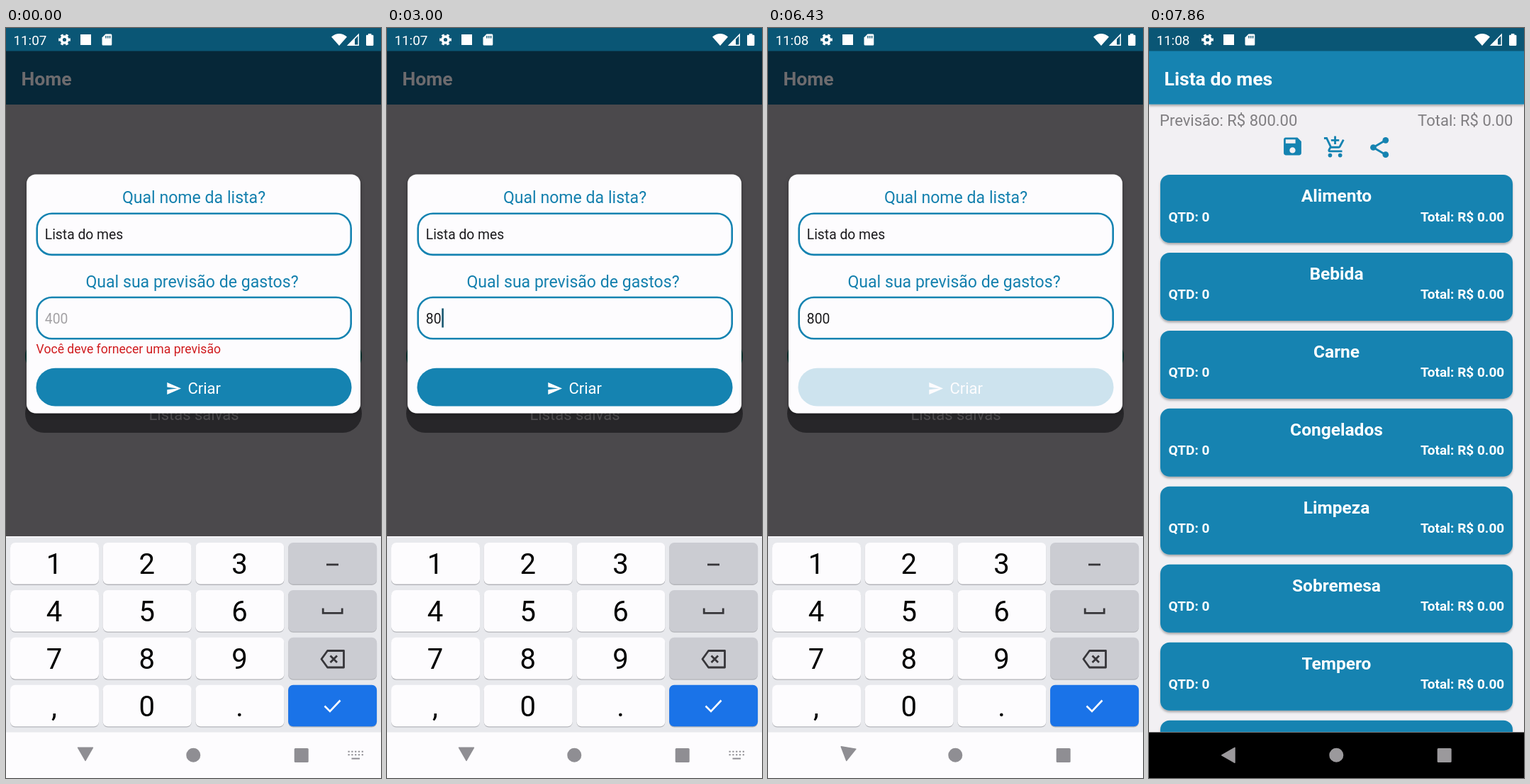
An HTML page that plays this animation: 529 by 1058 pixels, repeating every 8000 ms.

```html
<!DOCTYPE html>
<html lang="pt">
<head>
<meta charset="utf-8">
<title>Lista do mes</title>
<style>
  html, body { margin: 0; width: 100%; height: 100%; overflow: hidden; background: #f2f0f3; }
  svg { display: block; width: 100%; height: 100%; }
  text { font-family: Roboto, "Open Sans", sans-serif; white-space: pre; }
  .bold { font-weight: 700; }
  .mid { text-anchor: middle; }
  .end { text-anchor: end; }
</style>
</head>
<body>
<svg id="stage" viewBox="0 0 529 1058" xmlns="http://www.w3.org/2000/svg">
  <defs>
    <filter id="soft" x="-5%" y="-10%" width="110%" height="130%">
      <feDropShadow dx="0" dy="2.4" stdDeviation="1.8" flood-color="#000" flood-opacity=".3"/>
    </filter>
    <filter id="lift" x="-5%" y="-5%" width="110%" height="110%">
      <feDropShadow dx="0" dy="2" stdDeviation="3" flood-color="#000" flood-opacity=".3"/>
    </filter>
    <clipPath id="view"><rect id="viewBox" y="108" width="529" height="885"/></clipPath>
  </defs>

  <g id="home">
    <rect width="529" height="1058" fill="#4b494c"/>
    <rect y="32" width="529" height="76" fill="#062738"/>
    <text class="bold" x="21.5" y="81" font-size="26.6" fill="#6d6b6e">Home</text>
    <rect x="27" y="436" width="475" height="54" rx="27" fill="#06332f"/>
    <rect x="27" y="517" width="475" height="54" rx="27" fill="#272629"/>
    <text class="mid" x="265" y="553" font-size="22" fill="#504e51">Listas salvas</text>

    <rect x="29" y="206.5" width="471" height="337" rx="13" fill="#fdfcfe" filter="url(#lift)"/>
    <g class="mid" font-size="23.1" fill="#1480ae">
      <text x="265" y="247">Qual nome da lista?</text>
      <text x="262.5" y="365.5">Qual sua previsão de gastos?</text>
    </g>
    <g fill="none" stroke="#1583b1" stroke-width="2.6">
      <rect x="43.7" y="261.7" width="443" height="58.2" rx="21"/>
      <rect x="43.7" y="380" width="443" height="58.2" rx="21"/>
    </g>
    <g font-size="19.3">
      <text x="54.8" y="298" fill="#1b1a1d">Lista do mes</text>
      <text id="amount" x="54.8" y="416.6"></text>
    </g>
    <rect id="caret" y="395.5" width="2.6" height="27" fill="#17566f"/>
    <text id="error" x="42.6" y="458.6" font-size="17.6" fill="#d01c1f">Você deve fornecer uma previsão</text>
    <g id="create">
      <rect x="42.5" y="479.7" width="445" height="53.8" rx="26.9" fill="#1583b1"/>
      <path transform="translate(225.4 497.2) scale(.94)" fill="#fff" d="M2 21L23 12 2 3V10L17 12 2 14Z"/>
      <text x="256.4" y="516" font-size="22" fill="#fff">Criar</text>
    </g>
  </g>

  <g id="list">
    <rect width="529" height="1058" fill="#f2f0f3"/>
    <g clip-path="url(#view)">
      <g font-size="22" fill="#807e81">
        <text x="15" y="138">Previsão: R$ 800.00</text>
        <text class="end" x="513.3" y="138">Total: R$ 0.00</text>
      </g>
      <path transform="translate(185.9 150.4) scale(1.38)" fill="#1583b1" d="M17 3H5c-1.1 0-2 .9-2 2v14c0 1.1.9 2 2 2h14c1.1 0 2-.9 2-2V7l-4-4zm-5 16c-1.7 0-3-1.3-3-3s1.3-3 3-3 3 1.3 3 3-1.3 3-3 3zm3-10H5V5h10v4z"/>
      <g transform="translate(245.5 151.2) scale(1.42)" fill="none" stroke="#1583b1" stroke-width="2">
        <path d="M12 1V9M8 5H16M1 3H3.6L7.9 12H15.6Q16.3 12 16.7 11.3L20.3 4.5M7.4 12L6 14.5Q5.5 16 7 16H19"/>
        <g fill="#1583b1" stroke="none"><circle cx="7" cy="20" r="2"/><circle cx="17" cy="20" r="2"/></g>
      </g>
      <g transform="translate(307.7 151.1) scale(1.45)" fill="#1583b1">
        <path d="M18 5L6 12 18 19" fill="none" stroke="#1583b1" stroke-width="2"/>
        <circle cx="18" cy="5" r="3"/><circle cx="6" cy="12" r="3"/><circle cx="18" cy="19" r="3"/>
      </g>
      <g id="cards"></g>
      <rect id="bar" x="507.4" y="108" width="5.6" fill="#000"/>
    </g>
    <rect y="32" width="529" height="75.6" fill="#1583b1" filter="url(#soft)"/>
    <text class="bold" x="21.5" y="81" font-size="26.6" fill="#fff">Lista do mes</text>
  </g>

  <g id="status">
    <rect width="529" height="32.5" fill="#0a5675"/>
    <text id="clock" x="10.4" y="23.5" font-size="18.9" fill="#fff"></text>
    <g fill="none" stroke="#fff">
      <circle cx="82.5" cy="16.5" r="4.4" stroke-width="3.6"/>
      <circle cx="82.5" cy="16.5" r="7" stroke-width="2.8" pathLength="12" stroke-dasharray="1 1" stroke-dashoffset=".5"/>
    </g>
    <rect x="105" y="9" width="15" height="15" fill="#fff"/>
    <path d="M140.5 8.5H148Q149.3 8.5 149.3 10V23Q149.3 24.5 148 24.5H137Q135.5 24.5 135.5 23V13.5Z" fill="#fff"/>
    <path d="M141 11V14.5M143.8 11V14.5M146.6 11V14.5" stroke="#0a5675" stroke-width="1.4"/>
    <path d="M459 12.4Q470 3.6 481 12.4L470 25Z" fill="#fff"/>
    <path d="M482.6 24.2H497.2V9.4Z" fill="none" stroke="#fff" stroke-width="1.5"/>
    <path d="M482 25L492 14.8V25Z" fill="#fff"/>
    <path d="M511 8H515.4V9.7H517Q518.4 9.7 518.4 11V23.7Q518.4 25 517 25H509.4Q508 25 508 23.7V11Q508 9.7 509.4 9.7H511Z" fill="#fff"/>
  </g>

  <rect id="pad" y="717" width="529" height="341" fill="#fbfafd"/>
  <g id="keyboard">
    <rect y="718.5" width="529" height="276" fill="#e8e9ed"/>
    <g id="keys"></g>
    <g fill="none" stroke="#37363a" stroke-width="2.8">
      <path d="M452 757H469"/>
      <path d="M447.2 818.5V825.4H474.2V818.5"/>
      <path d="M453.5 878.5H476.5V902H453.5L445 890.2Z" stroke-linejoin="round"/>
      <path d="M457.5 885.5L467 895M467 885.5L457.5 895"/>
      <path d="M449.5 956.5L457 964L471.5 948.5" stroke="#fff" stroke-width="2.6"/>
    </g>
  </g>

  <g id="nav">
    <rect id="navBg" y="993.5" width="529" height="64.5"/>
    <g id="navIcons">
      <path id="back" d="M101.5 1015.2H122.5L112 1033.5Z" stroke-width="1.4" stroke-linejoin="round"/>
      <circle cx="264.3" cy="1025.7" r="10"/>
      <rect x="406.7" y="1016" width="20" height="20" rx="1.5"/>
      <g id="switcher" fill="none" stroke="#8f8e93" stroke-width="2">
        <path d="M482.5 1020.7H504M482.5 1025.3H504" stroke-dasharray="2.2 2.6"/>
        <path d="M487.5 1030.6H499"/>
      </g>
    </g>
  </g>
</svg>
<script>
const LOOP = 8000;
const DIGITS = [2290, 2860, 3570];
const CARET_FLIPS = [430, 1000, 1430, 2150, 2290, 4150, 4570, 5290, 5570, 6290];
const CLOCK = 5290, PRESS = 6290, FADED = 6430, OPEN = 6570, SETTLED = 6720;
const NAMES = ["Alimento", "Bebida", "Carne", "Congelados", "Limpeza", "Sobremesa", "Tempero", ""];

const $ = id => document.getElementById(id);
const set = (id, attrs) => {
  for (const k in attrs) $(id).setAttribute(k, attrs[k]);
};
const show = (id, on) => set(id, { visibility: on ? "visible" : "hidden" });
const passed = (times, t) => times.filter(x => t >= x).length;

$("cards").innerHTML = NAMES.map((name, i) => `
  <g transform="translate(0 ${207 + i * 109.95})" fill="#fff" class="bold">
    <rect x="16" width="497" height="96" rx="13" fill="#1583b1" filter="url(#soft)"/>
    <text class="mid" x="264.5" y="38" font-size="24.5">${name}</text>
    <text x="27.5" y="65.5" font-size="19">QTD: 0</text>
    <text class="end" x="501.2" y="65.5" font-size="19">Total: R$ 0.00</text>
  </g>`).join("");

const LABELS = ["123", "456", "789", ",0."];
let keys = "";
LABELS.forEach((row, r) => {
  for (let c = 0; c < 4; c++) {
    const x = 6 + c * 130.7, y = 726 + r * 66.9;
    const fill = c < 3 ? "#fdfcfe" : r < 3 ? "#cbccd2" : "#1a73e8";
    const box = `x="${x}" width="125" height="58.6" rx="7"`;
    keys += `<rect ${box} y="${y + 1.3}" fill="#b4b5ba"/><rect ${box} y="${y}" fill="${fill}"/>`;
    if (c < 3) keys += `<text class="mid" x="${x + 62}" y="${y + 44.3}" font-size="40" fill="#000">${row[c]}</text>`;
  }
});
$("keys").innerHTML = keys;

function draw(t) {
  const opened = t >= OPEN, settled = t >= SETTLED, sliding = opened && !settled;
  const typed = passed(DIGITS, t);

  $("clock").textContent = t < CLOCK ? "11:07" : "11:08";
  $("amount").textContent = typed ? "800".slice(0, typed) : "400";
  set("amount", { fill: typed ? "#1b1a1d" : "#a3a1a4" });
  set("caret", { x: 55.6 + typed * 10.84 });
  show("caret", !opened && passed(CARET_FLIPS, t) % 2);
  show("error", !opened && !typed);
  set("create", { opacity: t < PRESS ? 1 : t < FADED ? 0.6 : 0.2 });

  show("home", !opened);
  show("list", opened);
  set("viewBox", { height: settled ? 885 : 609 });
  set("bar", {
    height: settled ? 796 : 377,
    opacity: t < 7720 ? 0.3 : t < 7860 ? 0.15 : 0
  });

  show("pad", !settled);
  show("keyboard", !settled);
  set("keyboard", {
    transform: `translate(0 ${sliding ? 34 : 0})`,
    opacity: sliding ? 0.7 : 1
  });
  set("navBg", {
    fill: opened ? "#000" : "#fdfcfe",
    "fill-opacity": sliding ? 0.39 : 1
  });
  const icon = sliding ? "#6c6b6e" : settled ? "#9b999c" : "#8f8e93";
  set("navIcons", { fill: icon });
  set("back", {
    stroke: icon,
    transform: `rotate(${opened ? 90 : t >= FADED ? 9 : 0} 111.2 1025)`
  });
  show("switcher", t < FADED);
}

function tick() {
  draw(performance.now() % LOOP);
  requestAnimationFrame(tick);
}
tick();
</script>
</body>
</html>
```
